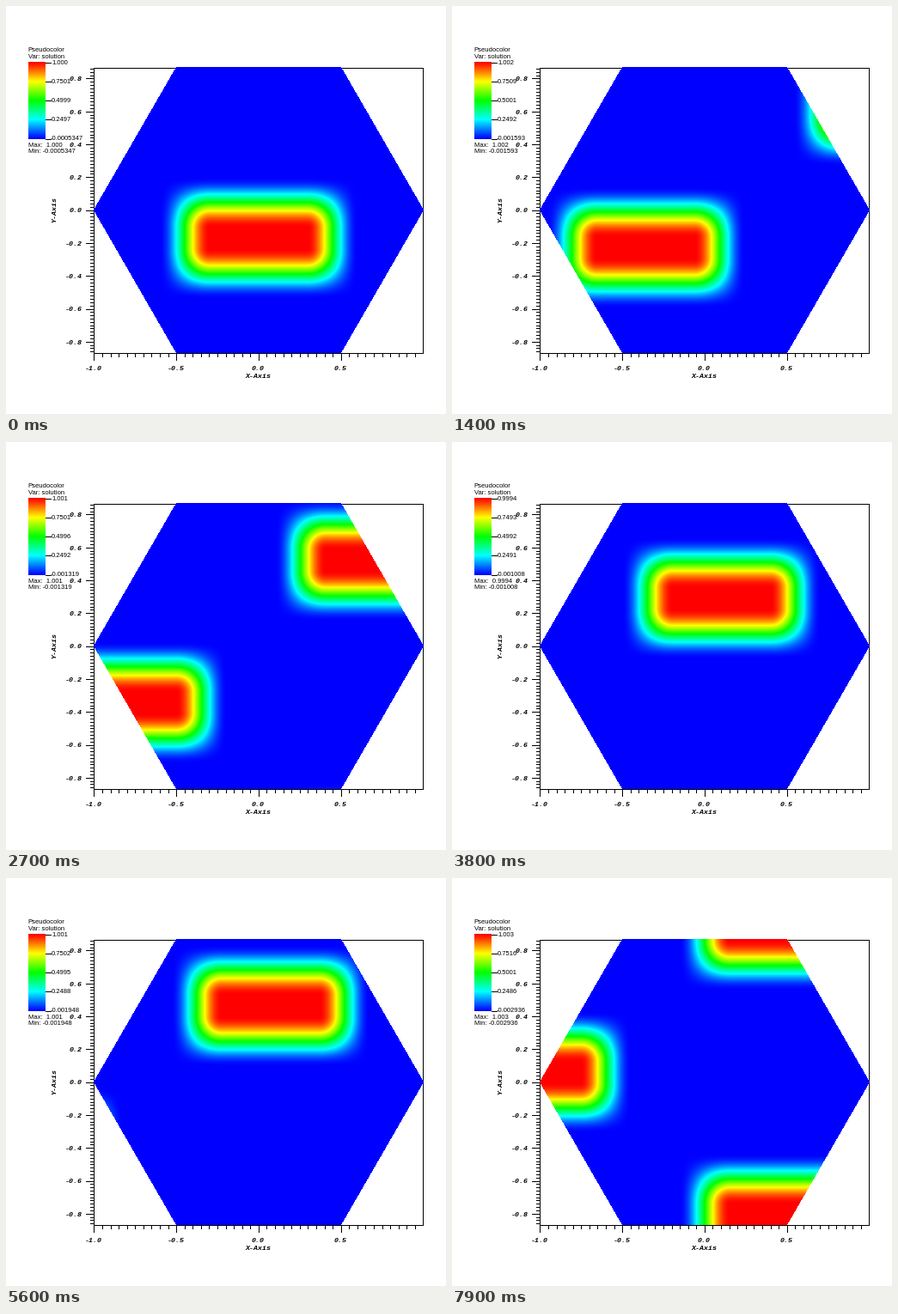
A matplotlib script that plays this animation: 512x475 px, repeating every 8000 ms.

```python
import math

import matplotlib.pyplot as plt
import numpy as np
from matplotlib.animation import FuncAnimation
from matplotlib.colors import LinearSegmentedColormap

W, H, DPI = 512, 475, 100
FRAMES, INTERVAL = 80, 100
PX = 72 / DPI  # one pixel in points

# Plot area in pixels and the data scale
LEFT, RIGHT, TOP, BOTTOM = 102, 486, 71, 404
X0, Y0, SCALE = 294.0, 237.5, 191.5
R3 = math.sqrt(3)

# Smooth-edged box carried diagonally through a periodic hexagon
START = np.array([0.0, -0.171])
STEP = 0.1 * np.array([math.sqrt(2 / 3), math.sqrt(1 / 3)])
HALF_X, HALF_Y, RAMP = 0.45, 0.217, 0.31

# Extremes of the solution at a few steps
KEYS = [0, 14, 27, 38, 56, 69, 79]
LOWS = [-.0005347, -.001593, -.001319, -.001008, -.001948, -.002055, -.002936]
HIGHS = [1.0003, 1.0017, 1.0006, 0.9994, 1.0009, 1.00217, 1.0031]

cmap = LinearSegmentedColormap.from_list(
    "hot5", [(0, 0, 1), (0, 1, 1), (0, 1, 0), (1, 1, 0), (1, 0, 0)], N=512)
cmap.set_bad(alpha=0)

xs = (np.arange(LEFT, RIGHT) + 0.5 - X0) / SCALE
ys = (Y0 - np.arange(TOP, BOTTOM) - 0.5) / SCALE
outside = np.abs(xs)[None, :] + np.abs(ys)[:, None] / R3 > 1.0035


def bump(s, half):
    t = np.clip((half - np.abs(s)) / RAMP + 0.5, 0, 1)
    return (1 - np.cos(np.pi * t)) / 2


def field(n):
    cx, cy = START + n * STEP
    k = round(cx / 1.5)
    cx, cy = cx - 1.5 * k, cy - R3 / 2 * k
    cy -= R3 * round(cy / R3)
    u = np.zeros((len(ys), len(xs)))
    for i in (-1, 0, 1):
        column = sum(bump(ys - cy - R3 * (i / 2 + j), HALF_Y)
                     for j in range(-2, 3))
        u += np.outer(column, bump(xs - cx - 1.5 * i, HALF_X))
    return np.ma.array(u, mask=outside)


fig = plt.figure(figsize=(W / DPI, H / DPI), dpi=DPI, facecolor="white")
ax = fig.add_axes([0, 0, 1, 1])
ax.axis("off")


def line(x, y):
    # the small offset keeps pixel snapping on the intended side
    ax.plot(np.array(x) - 0.1, np.array(y) + 0.1, color="black", lw=PX,
            antialiased=False, zorder=1, solid_capstyle="butt",
            solid_joinstyle="miter")


def sans(x, y, s=""):
    return ax.text(x, y, s, family="Liberation Sans", size=7.6 * PX, zorder=4)


def mono(x, y, s, **kw):
    ax.text(x, y, s, family="Liberation Mono", style="italic",
            weight="bold", size=8.3 * PX, zorder=4, **kw)


image = ax.imshow(field(0), cmap=cmap, vmin=0, vmax=1, aspect="auto",
                  interpolation="nearest", zorder=2,
                  extent=(LEFT, RIGHT, BOTTOM, TOP))
ax.imshow(np.linspace(1, 0, 90)[:, None], cmap=cmap, vmin=0, vmax=1,
          aspect="auto", interpolation="nearest", extent=(26, 46, 155, 65))
ax.set_xlim(0, W)
ax.set_ylim(H, 0)

# Frame and axes
l, r, t, b = LEFT + 0.5, RIGHT - 0.5, TOP + 0.5, BOTTOM - 0.5
line([l, r, r, l, l], [t, t, b, b, t])
for i in range(40):
    x = X0 + (-1 + 0.05 * i) * SCALE
    line([x, x], [b, b + (8 if i % 10 == 0 else 4)])
for i in range(-43, 44):
    y = Y0 - 0.02 * i * SCALE
    line([l - (9 if i % 10 == 0 else 4), l], [y, y])
for v in (-1, -0.5, 0, 0.5):
    mono(X0 - 0.5 + v * SCALE, 423.5, f"{v:.1f}", ha="center")
for i in range(-4, 5):
    mono(89, Y0 - 0.2 * i * SCALE + 3, f"{0.2 * i:.1f}", ha="right")
mono(293, 433, "X-Axis", ha="center")
mono(56.5, 237, "Y-Axis", ha="center", va="center", rotation=90)

# Legend
sans(25.5, 53, "Pseudocolor")
sans(25.5, 61, "Var: solution")
labels = []
for i in range(5):
    y = 65.5 + 22.25 * i
    line([46, 52], [y, y])
    labels.append(sans(53 if i < 4 else 51.5, y + 2))
max_text, min_text = sans(25.5, 163.5), sans(25.5, 171)


def fmt(v):
    return f"{v:#.4g}"


def update(n):
    low, high = np.interp(n, KEYS, LOWS), np.interp(n, KEYS, HIGHS)
    image.set_data(field(n))
    for i, label in enumerate(labels):
        label.set_text(fmt(high + (low - high) * i / 4))
    max_text.set_text("Max:  " + fmt(high))
    min_text.set_text("Min: " + fmt(low))
    return [image, max_text, min_text, *labels]


anim = FuncAnimation(fig, update, frames=FRAMES, interval=INTERVAL,
                     repeat=True, repeat_delay=0, blit=False)
plt.show()
```
